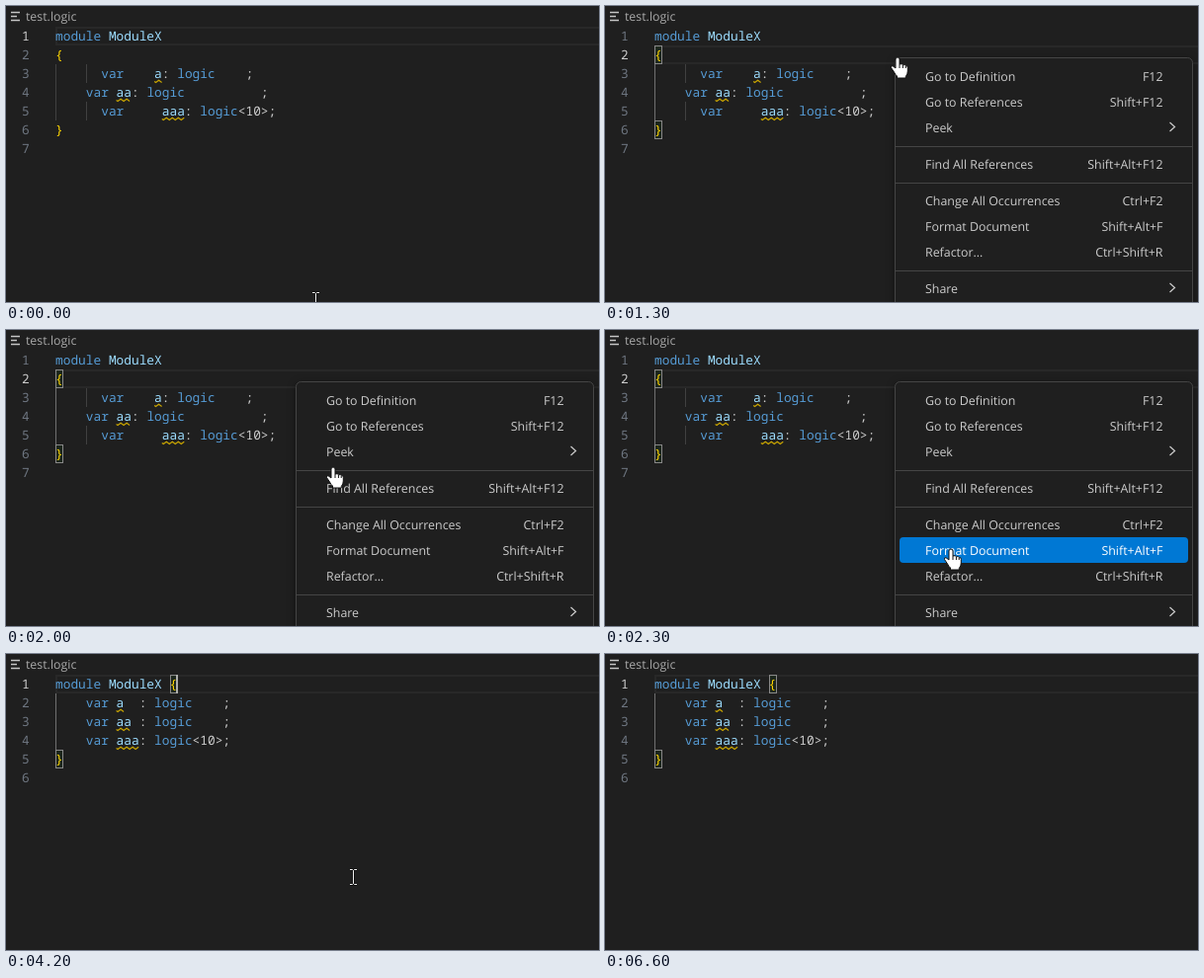
Recreate the animation shown at these times as an HTML page. Size 600 by 300 pixels, loop 6.7 s.

```html
<!DOCTYPE html>
<html lang="en">
<head>
<meta charset="utf-8">
<title>Format document</title>
<style>
  html, body { margin: 0; width: 100%; height: 100%; overflow: hidden; background: #1f1f1f; }
  svg { display: block; width: 600px; height: 300px; }
  text { white-space: pre; text-rendering: geometricPrecision; fill: #ccc; }
  .code { font: 12.83px "Noto Sans Mono", "DejaVu Sans Mono", monospace; }
  .ui { font: 12.4px "Open Sans", "Noto Sans", sans-serif; }
  .key { fill: #569cd6; }
  .name { fill: #9cdcfe; }
  .brace { fill: #ffd700; }
  .wave { fill: none; stroke: #cca700; stroke-width: 1.1; }
  .panel { fill: #1f1f1f; stroke: #454545; filter: drop-shadow(0 2px 4px #0006); }
</style>
</head>
<body>
<svg viewBox="0 0 600 300">
  <path d="M5 6.5h9M5 10.5h6M5 14.5h9" stroke="#c5c5c5" stroke-width="1.5"/>
  <text class="ui" x="20" y="15" style="fill:#a9a9a9">test.logic</text>
  <g id="editor"></g>
  <rect id="caret" x="172" y="21" width="2" height="19" fill="#aeafad"/>
  <g id="menu">
    <rect class="panel" x="293.5" y="52.5" width="301" height="270" rx="5"/>
    <path d="M294 142.5h301M294 179.5h301M294 268.5h301" stroke="#454545"/>
    <rect id="hover" x="298" width="292" height="26" rx="4" fill="#0078d4"/>
    <g id="items"></g>
  </g>
  <g id="beam" fill="none">
    <path d="M-3.5-7.5h2.5l1 1 1-1h2.5M0-6.5v13M-3.5 7.5h2.5l1-1 1 1h2.5" stroke="#111" stroke-width="2.4"/>
    <path d="M-3.5-7.5h2.5l1 1 1-1h2.5M0-6.5v13M-3.5 7.5h2.5l1-1 1 1h2.5" stroke="#eee"/>
  </g>
  <g id="hand" stroke="#111">
    <path fill="#fff" d="M-2 2a2 2 0 0 1 4 0V7q2.500-1 3.500.8q2-.8 2.800.8q2-.6 2 1.800V14q0 3-2 5.500V21H-.5V19q-1.500-1-3-4l-3-4.500q-.5-2 1.500-1.800l3 2.300z"/>
    <path fill="none" d="M2 7v4M5.400 8v3M8.200 9v2"/>
  </g>
</svg>
<script>
const LOOP = 6700, STEP = 100, LEFT = 50, COL = 7.7, ROW = 19, TOP = 21;
const OPEN = 1100, FORMAT = 3200, RECHECK = 3600, BLINK = 485;
const $ = id => document.getElementById(id);
const colX = c => LEFT + c * COL;
const rowY = r => TOP + (r - 1) * ROW;

const messy = [
  'module ModuleX', '{',
  '      var    a: logic    ;',
  '    var aa: logic          ;',
  '      var     aaa: logic<10>;',
  '}', ''];
const tidy = [
  'module ModuleX {',
  '    var a  : logic    ;',
  '    var aa : logic    ;',
  '    var aaa: logic<10>;',
  '}', ''];

// Row, column and length of each warning
const messyWaves = [[3, 13, 1], [4, 8, 2], [5, 14, 3]];
const staleWaves = [[2, 10.5, 1], [3, 8, 3], [4, 8, 3]];
const tidyWaves = [[2, 8, 1], [3, 8, 2], [4, 8, 3]];

// Row, column, height in rows and colour of each indent guide
const DIM = '#404040', LIT = '#707070';
const messyGuides = c => [[3, 0, 3, c], [3, 4, 1, DIM], [5, 4, 1, DIM]];

const states = [
  { from: 0, lines: messy, active: 1, waves: messyWaves, guides: messyGuides(DIM), pair: [] },
  { from: OPEN - STEP, lines: messy, active: 2, waves: messyWaves, guides: messyGuides(LIT), pair: [[2, 0], [6, 0]] },
  { from: FORMAT, lines: tidy, active: 1, waves: staleWaves, guides: [[2, 0, 3, LIT]], pair: [[1, 15], [5, 0]] },
  { from: RECHECK, lines: tidy, active: 1, waves: tidyWaves, guides: [[2, 0, 3, LIT]], pair: [[1, 15], [5, 0]] }
];

const paint = line => line.replace(/[A-Za-z]+|[{}]|</g, word => {
  if (word === '<') return '&lt;';
  const kind = /[{}]/.test(word) ? 'brace' : /^(module|var|logic)$/.test(word) ? 'key' : 'name';
  return `<tspan class="${kind}">${word}</tspan>`;
});

function wave([row, col, len]) {
  const y = rowY(row) + 18.5, start = colX(col), end = start + len * COL;
  let d = `M${start} ${y - 1}`;
  for (let x = start + 1.5, up = 0; x <= end; x += 3, up = 1 - up) d += `L${x} ${y - up * 2.3}`;
  return `<path class="wave" d="${d}"/>`;
}

function editor({ lines, active, waves, guides, pair }) {
  let out = `<rect x="${LEFT + 1}" y="${rowY(active) + 1}" width="560" height="${ROW - 2}" fill="none" stroke="#282828" stroke-width="2"/>`;
  for (const [r, c, h, color] of guides)
    out += `<rect x="${Math.round(colX(c))}" y="${rowY(r)}" width="1" height="${h * ROW}" fill="${color}"/>`;
  for (const [r, c] of pair)
    out += `<rect x="${Math.round(colX(c)) + .5}" y="${rowY(r) + .5}" width="7" height="${ROW - 1}" fill="#0064001a" stroke="#888"/>`;
  lines.forEach((line, i) => {
    const y = rowY(i + 1) + 14;
    out += `<text class="code" x="16" y="${y}" style="fill:${i + 1 === active ? '#ccc' : '#6e7681'}">${i + 1}</text>`
         + `<text class="code" x="${LEFT}" y="${y}">${paint(line)}</text>`;
  });
  return out + waves.map(wave).join('');
}

// Centre, label and shortcut; an empty shortcut opens a submenu
const items = [
  [71, 'Go to Definition', 'F12'],
  [97, 'Go to References', 'Shift+F12'],
  [123, 'Peek', ''],
  [160, 'Find All References', 'Shift+Alt+F12'],
  [197, 'Change All Occurrences', 'Ctrl+F2'],
  [223, 'Format Document', 'Shift+Alt+F'],
  [249, 'Refactor...', 'Ctrl+Shift+R'],
  [286, 'Share', '']
];
$('items').innerHTML = items.map(([y, label, keys]) =>
  `<g><text class="ui" x="324" y="${y + 5}">${label}</text>` + (keys
    ? `<text class="ui" x="564.5" y="${y + 5}" text-anchor="end">${keys}</text>`
    : `<path d="M571.5 ${y - 5}l5 4.500-5 4.500" fill="none" stroke="#ccc" stroke-width="1.2"/>`) + '</g>').join('');

// Time, x, y
const path = [
  [0, 313, 298], [100, 313, 298], [700, 296, 52], [1400, 296, 52], [1700, 316, 72],
  [1800, 316, 72], [2230, 350, 222], [2300, 350, 222], [2800, 351, 226],
  [4200, 351, 226], [4500, 368, 312], [LOOP, 368, 312]];

function pointer(t) {
  const i = path.findIndex(p => p[0] > t);
  const [t0, x0, y0] = path[i - 1], [t1, x1, y1] = path[i];
  const u = (t - t0) / (t1 - t0), e = u * u * (3 - 2 * u);
  return [x0 + (x1 - x0) * e, y0 + (y1 - y0) * e];
}

const show = (id, on) => $(id).setAttribute('visibility', on ? 'visible' : 'hidden');
let current;

function draw(t) {
  const state = states.filter(s => s.from <= t).pop();
  if (state !== current) $('editor').innerHTML = editor(current = state);

  const [x, y] = pointer(t).map(Math.round);
  const open = t >= OPEN && t < FORMAT;
  const hit = open && x >= 298 ? items.findIndex(([c]) => y >= c - 13 && y < c + 13) : -1;
  $('menu').style.display = open ? '' : 'none';
  $('hover').style.display = hit < 0 ? 'none' : '';
  if (hit >= 0) $('hover').setAttribute('y', items[hit][0] - 13);
  [...$('items').children].forEach((g, i) => {
    g.firstChild.style.fill = i === hit ? '#fff' : '';
    g.lastChild.style.fill = i === hit && items[i][2] ? '#fff' : '';
  });

  show('hand', open);
  show('beam', !open);
  $('hand').setAttribute('transform', `translate(${x} ${y})`);
  $('beam').setAttribute('transform', `translate(${x + .5} ${y})`);
  show('caret', t >= FORMAT && Math.floor((t - FORMAT) / BLINK) % 2 === 0);
}

let start;
function tick(now) {
  start ??= now;
  const t = (now - start) % LOOP;
  draw(Math.floor(t / STEP) * STEP);
  requestAnimationFrame(tick);
}
draw(0);
requestAnimationFrame(tick);
</script>
</body>
</html>
```
